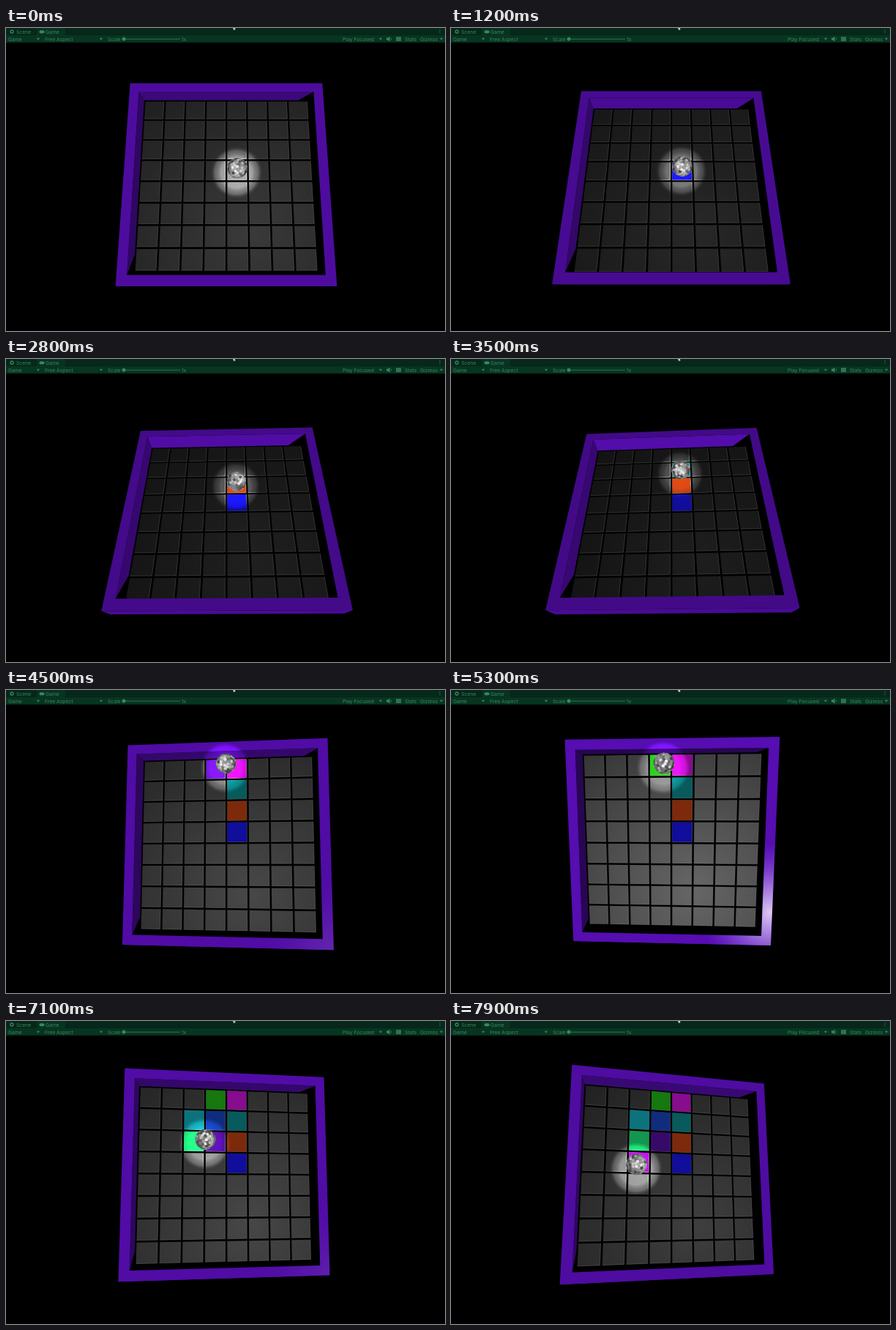
An HTML page with a canvas that plays this animation: 600 by 414 pixels, repeating every 8 s.

```html
<!DOCTYPE html>
<html lang="en">
<head>
<meta charset="utf-8">
<title>Tilting board</title>
<style>
  html, body { margin: 0; width: 100%; height: 100%; overflow: hidden; background: #000; }
  canvas, svg { position: absolute; left: 0; top: 0; width: 600px; height: 414px; }
  text { font: 6.8px Inter, Roboto, sans-serif; }
  .ink { fill: #36895f; }
</style>
</head>
<body>
<canvas id="stage" width="600" height="414"></canvas>
<svg viewBox="0 0 600 414">
  <defs><path id="arrow" d="M-2.2-1.2h4.4L0 1.4z"/></defs>
  <rect width="600" height="10" fill="#06271a"/>
  <rect x="42" width="39" height="10" fill="#083222"/>
  <rect y="10" width="600" height="10" fill="#083521"/>
  <rect y="19.5" width="600" height="1" fill="#03170e"/>
  <g class="ink">
    <text x="14" y="7.6">Scene</text>
    <text x="54" y="7.6">Game</text>
    <text x="3" y="17.5">Game</text>
    <text x="53" y="17.5">Free Aspect</text>
    <text x="139" y="17.5">Scale</text>
    <text x="240" y="17.5">1x</text>
    <text x="460" y="17.5">Play Focused</text>
    <text x="545" y="17.5">Stats</text>
    <text x="566" y="17.5">Gizmos</text>
    <use href="#arrow" x="44" y="15"/><use href="#arrow" x="130" y="15"/>
    <use href="#arrow" x="512" y="15"/><use href="#arrow" x="595" y="15"/>
    <circle cx="161" cy="15" r="2.5"/>
    <path d="M163 14.7h75v.7h-75zM520 13.6h2l2.5-2v7l-2.5-2h-2z"/>
    <path d="M533 12.3h7v1.4h-7zM533 14.3h7v1.4h-7zM533 16.3h7v1.4h-7z"/>
    <rect x="45.5" y="3.2" width="7" height="4" rx="2"/>
    <path d="M592.5 2h1v1h-1zM592.5 4h1v1h-1zM592.5 6h1v1h-1z"/>
  </g>
  <circle cx="8" cy="5" r="2" fill="none" stroke="#36895f" stroke-width="1.3"/>
  <path d="M526 13.3q1.3 1.7 0 3.4" fill="none" stroke="#36895f" stroke-width=".7"/>
  <path d="M310 0h3l.6 2.6-1.2-.4-.8 1z" fill="#ccc"/>
</svg>
<script>
const ctx = document.getElementById('stage').getContext('2d');
const LOOP = 8000, STEP = 100, N = 8, TILE = 0.905, SPAN = N - 1 + TILE;

// The board is a box of half width 1 that turns about the centre of its floor.
const UNIT = 131.4, EYE = 2.75, HEIGHT = 0.184, INNER = 0.904, FLOOR = 0.89, BALL = 0.102;
const PURPLE = [78, 12, 160];

// time, pitch and yaw in degrees
const tilts = [
  [0, 10.5, 0], [2000, 26.9, 0], [3500, 31, 2.7], [4500, 4.2, 4.5],
  [5300, -6.3, 2.6], [6200, 0.3, 0.8], [7900, 7.9, -10.9]
];
// time, column and row
const rolls = [
  [0, 4.45, 3.45], [2000, 4.45, 3.4], [3500, 4.44, 1.85], [4000, 4.45, 0.5], [4500, 3.98, 0.36],
  [4800, 4.2, 0.4], [5300, 3.66, 0.45], [6200, 3.17, 1.32], [6450, 2.7, 1.4],
  [6700, 3.3, 1.6], [6950, 3.35, 2.4], [7250, 2.6, 2.5], [7900, 2.33, 3.64]
];
// Paint in the order the ball enters tiles
const paints = [
  '#100e9a', '#7d2a0c', '#085a5c', '#870c8e', '#4b0f8c', '#870c8e', '#16780f',
  '#1e826c', '#0c737d', '#102d7d', '#370a69', '#149650', '#78089a'
];

const rgb = (c, k = 1) => `rgb(${c.map(v => Math.round(v * k)).join()})`;
const gray = v => rgb([v, v, v]);
const mix = (p, q, f) => p.map((v, i) => v + (q[i] - v) * f);
const clamp = (v, lo, hi) => Math.max(lo, Math.min(hi, v));
const smooth = f => f * f * (3 - 2 * f);
const place = n => (n / SPAN * 2 - 1) * FLOOR;

function sample(keys, t, ease = f => f) {
  const i = keys.findLastIndex((k, j) => t >= k[0] && j < keys.length - 1);
  const [a, b] = [keys[i], keys[i + 1]];
  return mix(a, b, ease(Math.min(1, (t - a[0]) / (b[0] - a[0])))).slice(1);
}

// Each tile the ball enters takes the next paint.
const hits = [];
for (let t = 500, last; t < LOOP; t += STEP) {
  const [c, r] = sample(rolls, t).map(Math.floor), tile = r * N + c;
  if (tile !== last) hits.push({ t, tile, paint: paints[hits.length % paints.length] });
  last = tile;
}

// Shaded facets spread evenly over a sphere
const facets = Array.from({ length: 150 }, (_, i) => {
  const y = 1 - (i + 0.5) / 75, a = i * 2.39996, q = Math.sqrt(1 - y * y);
  return { x: q * Math.cos(a), y, z: q * Math.sin(a), shade: Math.abs(Math.sin(i * 127.1) * 4375.5) % 1 };
});

// Yaw, then pitch, then perspective; returns x, y and scale
function camera(pitch, yaw) {
  const [p, q] = [pitch, yaw].map(d => d * Math.PI / 180);
  const sp = Math.sin(p), cp = Math.cos(p), sq = Math.sin(q), cq = Math.cos(q);
  return (x, y, z) => {
    const depth = x * sq + z * cq;
    const scale = UNIT * EYE / (EYE - y * sp - depth * cp);
    return [301 + (x * cq - z * sq) * scale, 209 + (y * cp - depth * sp) * scale, scale];
  };
}

const quad = (view, x0, y0, x1, y1, z) =>
  [view(x0, y0, z), view(x1, y0, z), view(x1, y1, z), view(x0, y1, z)];
const square = (view, half, z) => quad(view, -half, -half, half, half, z);

function trace(...polys) {
  ctx.beginPath();
  for (const poly of polys) {
    poly.forEach(([x, y], i) => i ? ctx.lineTo(x, y) : ctx.moveTo(x, y));
    ctx.closePath();
  }
}

function fill(style, ...polys) {
  trace(...polys);
  ctx.fillStyle = style;
  ctx.fill('evenodd');
}

function drawTile(poly, style, edge) {
  fill(style, poly);
  trace(poly.slice(1));
  ctx.lineWidth = 0.9;
  ctx.strokeStyle = `rgba(255,255,255,${edge})`;
  ctx.save();
  ctx.clip();
  ctx.restore();
  ctx.beginPath();
  poly.slice(1).forEach(([x, y], i) => i ? ctx.lineTo(x, y) : ctx.moveTo(x, y));
  ctx.stroke();
}

function drawSpot(x, y, r, power) {
  const g = ctx.createRadialGradient(x, y, 0, x, y, r);
  const tone = k => gray(255 * power * k);
  g.addColorStop(0, tone(1));
  g.addColorStop(0.6, tone(0.97));
  g.addColorStop(0.85, tone(0.72));
  g.addColorStop(1, '#000');
  ctx.globalCompositeOperation = 'color-dodge';
  ctx.fillStyle = g;
  ctx.beginPath();
  ctx.arc(x, y, r, 0, 7);
  ctx.fill();
  ctx.globalCompositeOperation = 'source-over';
}

function drawBall(x, y, r) {
  ctx.save();
  ctx.translate(x, y);
  ctx.beginPath();
  ctx.arc(0, 0, r, 0, 7);
  ctx.fillStyle = '#888';
  ctx.fill();
  ctx.clip();
  const sx = Math.sin(x / r), cx = Math.cos(x / r), sy = Math.sin(y / r), cy = Math.cos(y / r);
  for (const p of facets) {
    const px = p.x * cx + p.z * sx, pz = p.z * cx - p.x * sx;
    const py = p.y * cy + pz * sy, z = pz * cy - p.y * sy;
    if (z < 0) continue;
    ctx.fillStyle = gray(85 + 165 * p.shade);
    ctx.beginPath();
    ctx.ellipse(px * r, py * r, 2.2, 0.6 + 1.6 * z, Math.atan2(py, px) + Math.PI / 2, 0, 7);
    ctx.fill();
  }
  const shade = ctx.createRadialGradient(0, -r * 0.15, r * 0.5, 0, 0, r);
  shade.addColorStop(0, 'rgba(0,0,0,0)');
  shade.addColorStop(1, 'rgba(0,0,0,.45)');
  ctx.fillStyle = shade;
  ctx.fillRect(-r, -r, 2 * r, 2 * r);
  ctx.restore();
}

function draw(t) {
  const [pitch, yaw] = sample(tilts, t, smooth), [col, row] = sample(rolls, t);
  const view = camera(pitch, yaw);
  const outer = square(view, 1, HEIGHT), inner = square(view, INNER, HEIGHT);
  const foot = square(view, 1, 0), base = square(view, INNER, 0);
  const [bx, by, scale] = view(place(col), place(row), BALL);
  const ballR = BALL * scale, spot = [bx - 1, by + 6, ballR * 2.55];

  // Light falls off as the board leans away.
  const tone = 72 - 2.4 * pitch + 0.03 * pitch * pitch;
  const lit = 1.06 - 0.007 * pitch;

  ctx.fillStyle = '#000';
  ctx.fillRect(0, 0, 600, 414);
  fill(rgb(PURPLE, lit * 1.1), [outer[3], outer[2], foot[2], foot[3]]);
  fill('#000', inner);

  const tiles = Array.from({ length: N * N }, (_, i) => {
    const c = i % N, r = i / N | 0;
    return quad(view, place(c), place(r), place(c + TILE), place(r + TILE), 0);
  });
  const painted = new Map(hits.filter(h => h.t <= t).map(h => [h.tile, h.paint]));
  const [lx, ly] = view(0.24, 0.5, 0);
  const light = ctx.createRadialGradient(lx, ly, 0, lx, ly, 240);
  light.addColorStop(0, gray(tone * 1.15));
  light.addColorStop(1, gray(tone * 0.6));
  tiles.forEach(tile => drawTile(tile, light, 0.17));
  drawSpot(...spot, Math.min(0.73, 0.95 - 0.0045 * tone));
  for (const [i, paint] of painted) drawTile(tiles[i], paint, 0.06);

  const leftEnd = mix(base[0], base[3], 0.94 - 0.004 * pitch);
  const backEnd = mix(base[0], base[1], 0.955 - 0.0015 * pitch);
  fill(rgb(PURPLE, 0.55 + 0.005 * pitch), [inner[0], base[0], leftEnd, inner[3]]);
  fill(rgb(PURPLE, 0.6 + 0.015 * pitch), [inner[0], inner[1], backEnd, base[0]]);
  fill(rgb(PURPLE, lit), outer, inner);

  const glow = clamp(0.7 - 0.14 * pitch, 0, 0.85);
  const gx = outer[2][0], gy = outer[2][1] - Math.max(0, 4 - 6.5 * pitch);
  const shine = ctx.createRadialGradient(gx, gy, 0, gx, gy, 95);
  shine.addColorStop(0, `rgba(245,235,255,${glow})`);
  shine.addColorStop(0.35, `rgba(225,205,255,${glow * 0.65})`);
  shine.addColorStop(1, 'rgba(150,100,255,0)');
  fill(shine, outer, inner);

  // Coloured surfaces take a weaker spot.
  ctx.save();
  trace(outer, base, ...[...painted.keys()].map(i => tiles[i]));
  ctx.clip('evenodd');
  drawSpot(...spot, 0.45);
  ctx.restore();
  drawBall(bx, by, ballR);
}

const start = performance.now();
function tick() {
  const t = (performance.now() - start) % LOOP;
  draw(Math.floor(t / STEP) * STEP);
  requestAnimationFrame(tick);
}
tick();
</script>
</body>
</html>
```
